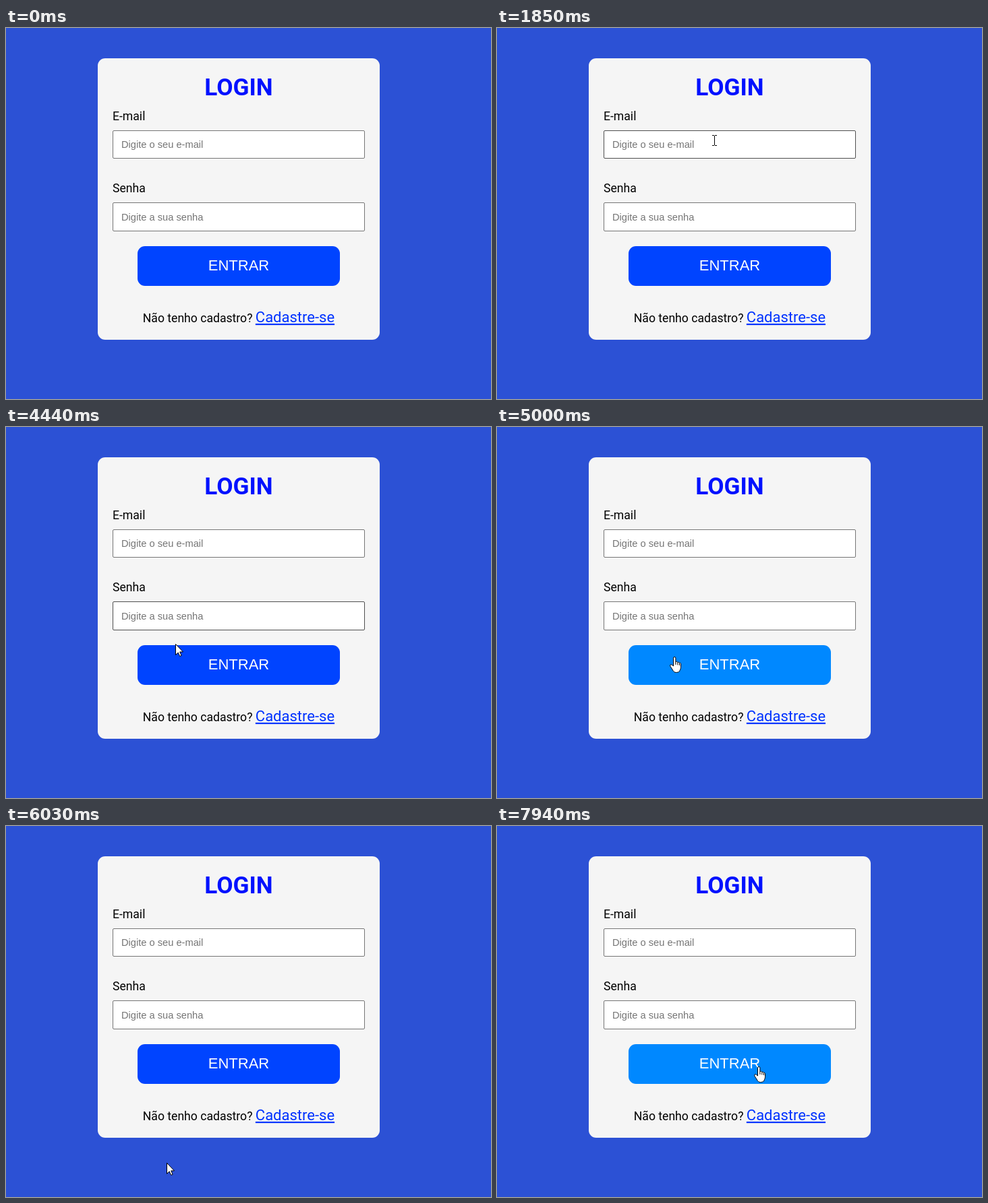
These frames come from a looping animation (719 by 551 pixels, 8 s). An HTML page:

```html
<!DOCTYPE html>
<html lang="pt-BR">
<head>
<meta charset="utf-8">
<title>Login</title>
<style>
  html, body { margin: 0; width: 100%; height: 100%; overflow: hidden; background: #2c51d5; }
  svg { display: block; width: 100vw; height: 100vh; }
  text { font-family: Roboto, sans-serif; font-size: 17.6px; fill: #000; white-space: pre; }
  .title { font-size: 35.2px; font-weight: 700; fill: #0011ff; }
  .hint, .action { font-family: "Liberation Sans", Arial, sans-serif; }
  .hint { font-size: 14.667px; fill: #757575; }
  .action { font-size: 22px; fill: #fff; }
  .link { font-size: 22px; fill: #0033ff; text-decoration: underline 2px; text-underline-offset: 2px; }
  .mid { text-anchor: middle; }
  .field { fill: #fff; stroke: #767676; }
  .field.hover { stroke: #4f4f4f; }
  .button { fill: #0044ff; }
  .button.hover { fill: #0088ff; }
  .pointer { fill: #fff; stroke: #000; stroke-linejoin: round; }
</style>
</head>
<body>
<svg viewBox="0 0 719 551">
  <rect width="719" height="551" fill="#2c51d5"/>
  <rect x="136" y="45" width="418" height="418" rx="11" fill="#f5f5f5"/>
  <text class="title mid" x="345" y="100">LOGIN</text>

  <text x="158" y="137">E-mail</text>
  <rect id="email" class="field" x="158.5" y="152.5" width="373" height="41" rx="1.5"/>
  <text class="hint" x="171" y="178">Digite o seu e-mail</text>

  <text x="158" y="244">Senha</text>
  <rect id="password" class="field" x="158.5" y="259.5" width="373" height="42" rx="1.5"/>
  <text class="hint" x="171" y="286">Digite a sua senha</text>

  <rect id="enter" class="button" x="195" y="324" width="300" height="59" rx="11"/>
  <text class="action mid" x="345" y="360">ENTRAR</text>

  <text id="signup" x="202.8" y="437">Não tenho cadastro? <tspan class="link">Cadastre-se</tspan></text>

  <g id="cursor">
    <path id="arrow" class="pointer" d="M.5.5V16.5L4.2 13l2.5 5.5 2.4-1L6.7 12H11.5Z"/>
    <path id="beam" d="M-3-8h3v1h1v-1h3v1h-3V7h3v1h-3V7H0v1h-3V7h3V-7h-3Z"/>
    <path id="hand" class="pointer" transform="translate(-8 -1)"
      d="M5.5 14V2.2a1.7 1.7 0 0 1 3.4 0V8c.4-1 2.8-.9 3 .8c.5-.8 2.4-.6 2.6.8c.6-.7 2-.3 2 1.2V15.5c0 3.5-1.6 4.5-2 6.5C13.5 23 11 23.5 9.5 23.5C7 23.5 5.5 22 4.5 20L.8 14.2C-.1 12.5 2 11 3.3 12.2ZM8.9 8v4M11.9 9v3.5M14.5 10v3"/>
  </g>
</svg>
<script>
const LOOP = 8000;
const TICK = 70;        // the pointer is sampled once per tick
const HOVER_LAG = 100;  // a hover style outlasts the pointer by this long
const $ = id => document.getElementById(id);

const linear = u => u;
const smooth = u => u * u * u * (u * (6 * u - 15) + 10);
const easeIn = p => u => u ** p;
const easeOut = p => u => 1 - (1 - u) ** p;

// Each glide starts where the one before it came to rest.
const moves = [];
let rest = [687, 595];
function glide(start, end, to, easeX, easeY = easeX) {
  moves.push({ start, end, from: rest, to, ease: [easeX, easeY] });
  rest = to;
}
glide(580, 1350, [406, 197], easeOut(1.34), easeOut(2.11));
glide(1420, 1850, [322, 167], easeOut(2));
glide(2380, 2450, [322, 165], linear);
glide(2720, 3490, [249, 280], smooth);
glide(3560, 3560, [249, 281], linear);
glide(4230, 4800, [264, 341], easeIn(2.5), easeOut(2));
glide(5000, 5750, [242, 480], smooth);
glide(5820, 6030, [238, 500], easeOut(1.5));
glide(6430, 6910, [238, 515], linear);
glide(7110, 7670, [388, 357], easeOut(1.2), easeOut(1.24));
glide(7940, 7940, [389, 358], linear);

function pointerAt(t) {
  const move = moves.findLast(m => t >= m.start);
  if (!move) return null;
  const { start, end, from, to, ease } = move;
  const steps = Math.floor((end - start) / TICK) + 1;
  const gap = (end - start) / (steps - 1) || TICK;
  const step = Math.min(steps, Math.floor((t - start) / gap + 0.1) + 1);
  return from.map((a, i) => Math.round(a + (to[i] - a) * ease[i](step / steps)));
}

// Reach is how far outside its box a zone already responds.
const zones = [
  { id: "email", left: 158, top: 152, right: 532, bottom: 194, reach: 3, cursor: "beam" },
  { id: "password", left: 158, top: 259, right: 532, bottom: 302, reach: 3, cursor: "beam" },
  { id: "enter", left: 195, top: 324, right: 495, bottom: 383, reach: 0, cursor: "hand" },
  { id: "signup", left: 203, top: 411, right: 367, bottom: 445, reach: 0, cursor: "beam" }
];

function inside(zone, pos, pad = 0) {
  if (!pos) return false;
  const [x, y] = pos;
  return x >= zone.left - pad && x <= zone.right + pad &&
         y >= zone.top - pad && y <= zone.bottom + pad;
}

function show(id, on) {
  $(id).style.display = on ? "" : "none";
}

function draw(t) {
  const pos = pointerAt(t);
  const trail = pointerAt(t - HOVER_LAG);
  for (const z of zones)
    $(z.id).classList.toggle("hover", inside(z, pos, z.reach) || inside(z, trail, z.reach));

  show("cursor", pos);
  if (!pos) return;
  $("cursor").setAttribute("transform", `translate(${pos})`);
  const shape = zones.find(z => inside(z, pos))?.cursor ?? "arrow";
  for (const id of ["arrow", "beam", "hand"]) show(id, id === shape);
}

let origin;
function tick(now) {
  origin ??= now;
  draw((now - origin) % LOOP);
  requestAnimationFrame(tick);
}
draw(0);
requestAnimationFrame(tick);
</script>
</body>
</html>
```
